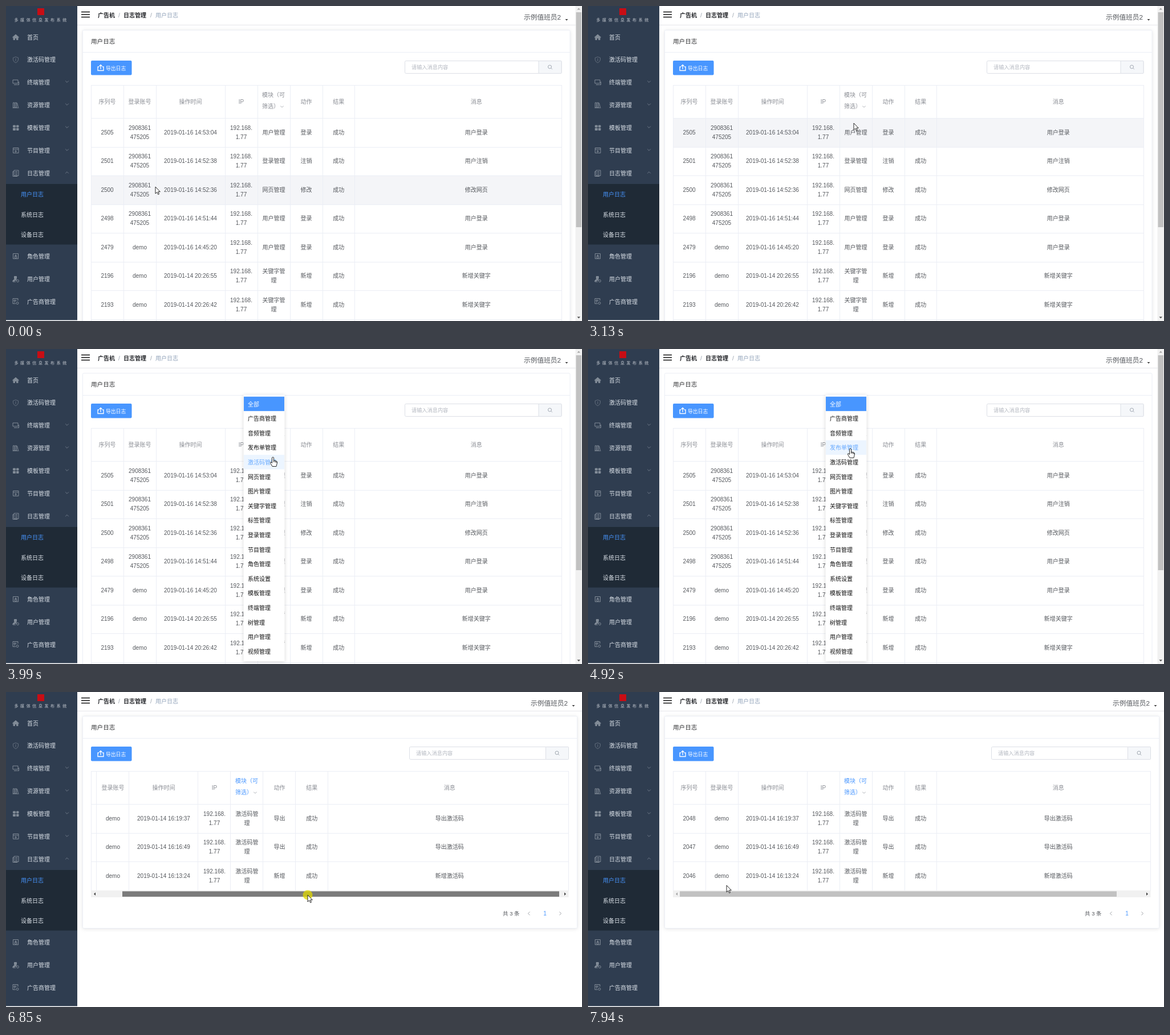
An HTML page for the animation above (8 s loop, 1010 by 554 pixels).

```html
<!DOCTYPE html>
<html lang="zh-CN">
<head>
<meta charset="utf-8">
<title>用户日志</title>
<style>
html, body { margin: 0; width: 100%; height: 100%; overflow: hidden; background: #fff; }
svg { display: block; font-family: "Liberation Sans", "Noto Sans CJK SC", "Noto Sans CJK", sans-serif; }
.line { fill: none; stroke: #ebeef5; shape-rendering: crispEdges; }
.icon { fill: none; stroke: #818b97; }
.solid { fill: #818b97; }
.faint { opacity: .6; }
.card { fill: #fff; stroke: #ebeef5; }
.raised .card { filter: drop-shadow(0 1px 3px rgba(0,0,0,.1)); }
</style>
</head>
<body>
<svg id="stage" width="1010" height="554" viewBox="0 0 1010 554"></svg>
<script>
const BLUE = '#4896ff', GREY = '#8a8d94', DARK = '#55585d', PALE = '#a0a4ab', MENU = '#dae0e7';
const stage = document.getElementById('stage');
const $ = id => document.getElementById(id);

// y is the visual middle of the line
const text = (x, y, s, size = 10, fill = DARK, anchor = 'start', more = '') =>
  `<text x="${x}" y="${y + size * .37}" font-size="${size}" fill="${fill}" text-anchor="${anchor}" ${more}>${s}</text>`;
const mid = (x, y, s, size, fill) => text(x, y, s, size, fill, 'middle');
const rect = (x, y, w, h, fill, more = '') =>
  `<rect x="${x}" y="${y}" width="${w}" height="${h}" fill="${fill}" ${more}/>`;
const path = (d, more = 'class="icon"') => `<path d="${d}" ${more}/>`;
const group = (id, body, more = '') => `<g id="${id}" ${more}>${body}</g>`;
// (dx, dy) is half the way from the open side to the tip
const chevron = (x, y, dx, dy, color) =>
  path(dx ? `M${x - dx} ${y - 3}l${dx * 2} 3l${-dx * 2} 3` : `M${x - 2.8} ${y - dy}l2.800 ${dy * 2}l2.800 ${-dy * 2}`,
    `fill="none" stroke="${color}" stroke-width=".8"`);

function sidebar() {
  const menu = [
    ['首页', 55, 'M11.500 55l5.500-5 5.500 5h-1.500v4.500h-2.500v-3h-3v3h-2.500v-4.500z', 'solid'],
    ['激活码管理', 94.5, 'M17 89.500l4.500 1.500v4q-1 3.500-4.500 5q-3.500-1.500-4.500-5v-4zM17 92v5', 'faint'],
    ['终端管理', 134, 'M12 130h9v6h-9zM14 138.500h5M22.500 133v5.500h-3'],
    ['资源管理', 174, 'M12.500 170v8.500h2.500v-8.500zM16 170v8.500h2.500v-8.500zM19.500 170.500l2 8M11.500 179h11'],
    ['模板管理', 214, 'M12.500 210h4v3h-4zM18.500 210h3.500v3h-3.500zM12.500 215h4v3.500h-4zM18.500 215h3.500v3.500h-3.500z', 'solid'],
    ['节目管理', 254, 'M12.500 249.500h9.500v9h-9.500zM12.500 252h9.500M16 254l3 1.500l-3 1.500z'],
    ['日志管理', 294, 'M14 289h8v9.500h-8zM14 291h-2v8.500h8M16 291.500h4M16 294h4M16 296.500h4'],
    ['角色管理', 440, 'M12.500 435.500h9v9h-9zM15 443v-2q2-2 4 0v2zM16 438h2v2h-2z'],
    ['用户管理', 480, 'M14.500 475.500h4v4h-4zM12 485v-2q4-5 7-1M12 485h5', 'solid'],
    ['广告商管理', 520, 'M21 518v-3.500h-9v9h5M14 517h3v2h-3zM18.500 517h1M14 521h2']
  ];
  const badge = (x, y) => `<circle cx="${x}" cy="${y}" r="2" class="icon"/>`;
  return rect(0, 0, 125, 552.5, '#2f3d50')
    + rect(0, 313, 125, 106.500, '#1f2a36')
    + rect(55, 4, 12, 12, '#c80d14')
    + text(14.5, 24, '多媒体信息发布系统', 7, '#c4c9d0', 'start', 'letter-spacing="3.6"')
    + menu.map(([s, y, d, style = '']) => path(d, `class="icon ${style}"`) + text(37, y, s, 10, MENU)).join('')
    + badge(20.5, 483.5) + badge(20, 522.5)
    + [134, 174, 214, 254, 294].map(y => chevron(107, y - 1, 0, y > 290 ? -1.4 : 1.4, '#7d8896')).join('')
    + [['用户日志', 331], ['系统日志', 367], ['设备日志', 402.5]]
        .map(([s, y], i) => text(26, y, s, 10, i ? MENU : BLUE)).join('');
}

function topBar() {
  const bold = (x, s) => text(x, 16.5, s, 10, '#222428', 'start', 'font-weight="bold"');
  const slash = x => text(x, 16.5, '/', 10, '#97a0ac');
  return path('M125 33.500H1010', 'class="line" style="stroke:#e4e6ea"')
    + path('M132 10.500h15M132 15h15M132 19.500h15', 'stroke="#111" stroke-width="1.6"')
    + bold(161, '广告机') + slash(197) + bold(206, '日志管理') + slash(253)
    + text(262, 16.5, '用户日志', 10, '#8fa1b8');
}

const COLS = [149, 206, 263, 384, 441, 498, 555, 611.5, 1038];
const HEADS = ['序列号', '登录账号', '操作时间', 'IP', '', '动作', '结果', '消息'];
const ROW_TOP = 197.5, ROW = 50.5;
const center = i => (COLS[i] + COLS[i + 1]) / 2;

function cell(col, y, lines) {
  return lines.map((s, i) => mid(center(col), y + (i - (lines.length - 1) / 2) * 16.2, s)).join('');
}

function table(id, rows, right, bottom, filtered) {
  const tint = filtered ? BLUE : GREY;
  let body = HEADS.map((s, i) => mid(center(i), 168, s, 10, GREY)).join('')
    + mid(469, 156, '模块（可', 10, tint) + text(449, 176.5, '筛选）', 10, tint)
    + chevron(484, 177, 0, 1.1, PALE);
  let lines = `M149 139.500H${right}M149 ${ROW_TOP}H${right}`;
  rows.forEach(([no, user, time, module, action, message], r) => {
    const y = ROW_TOP + ROW * (r + .5) - .7;
    lines += `M149 ${ROW_TOP + ROW * (r + 1)}H${right}`;
    [[no], user.split(' '), [time], ['192.168.', '1.77'], module.split(' '), [action], ['成功'], [message]]
      .forEach((parts, c) => body += cell(c, y, parts));
  });
  body += path(COLS.slice(1, 8).map(x => `M${x} 139V${bottom}`).join(''), 'class="line"');
  return `<clipPath id="${id}Clip"><rect x="149" y="139" width="${right - 149}" height="${bottom - 139}"/></clipPath>`
    + rect(149, 0, right - 149, ROW, '#f4f5f8', `id="${id}Hover"`)
    + `<g clip-path="url(#${id}Clip)">${group(id + 'Body', body)}</g>`
    + path(`${lines}M149 139V${bottom}M${right} 139V${bottom}`, 'class="line"');
}

function page(id, right, shift, cardBottom, content) {
  const split = right - 40, left = 699 + shift * 2 / 3;
  return group(id,
    `<rect class="card" x="134.500" y="42.500" width="${right + 15 - 134.5}" height="${cardBottom - 42.5}" rx="2"/>`
    + path(`M135 81.500H${right + 15}`, 'class="line"')
    + text(149, 62, '用户日志', 10.6, '#303133')
    + rect(149, 96, 71.5, 25.5, BLUE, 'rx="2"')
    + path('M163 107h-2v6.500h10v-6.500h-2M166 111v-7M163.500 106l2.500-2.500l2.500 2.500', 'fill="none" stroke="#fff" stroke-width="1.3"')
    + text(175, 109.5, '导出日志', 8.8, '#fff')
    + rect(left + .5, 96.5, right - left - .5, 22, '#fff', 'rx="2" stroke="#dcdfe6"')
    + rect(split, 96.5, 40, 22, '#f5f7fa', 'rx="1" stroke="#dcdfe6"')
    + text(left + 12, 107.5, '请输入消息内容', 9.2, '#b4b8c0')
    + `<g opacity=".75"><circle cx="${split + 19.5}" cy="107" r="3" class="icon"/>${path(`M${split + 21.8} 109.300l2 2`)}</g>`
    + text(908 + shift, 20, '示例值班员2', 11.7)
    + path(`M${980.5 + shift} 23h5l-2.500 2.800z`, 'fill="#444"')
    + content);
}

const ALL_ROWS = [
  ['2505', '2908361 475205', '2019-01-16 14:53:04', '用户管理', '登录', '用户登录'],
  ['2501', '2908361 475205', '2019-01-16 14:52:38', '登录管理', '注销', '用户注销'],
  ['2500', '2908361 475205', '2019-01-16 14:52:36', '网页管理', '修改', '修改网页'],
  ['2498', '2908361 475205', '2019-01-16 14:51:44', '用户管理', '登录', '用户登录'],
  ['2479', 'demo', '2019-01-16 14:45:20', '用户管理', '登录', '用户登录'],
  ['2196', 'demo', '2019-01-14 20:26:55', '关键字管 理', '新增', '新增关键字'],
  ['2193', 'demo', '2019-01-14 20:26:42', '关键字管 理', '新增', '新增关键字']
];
const CODE_ROWS = [
  ['2048', 'demo', '2019-01-14 16:19:37', '激活码管 理', '导出', '导出激活码'],
  ['2047', 'demo', '2019-01-14 16:16:49', '激活码管 理', '导出', '导出激活码'],
  ['2046', 'demo', '2019-01-14 16:13:24', '激活码管 理', '新增', '新增激活码']
];
const MODULES = '全部 广告商管理 音频管理 发布单管理 激活码管理 网页管理 图片管理 关键字管理 标签管理 登录管理 节目管理 角色管理 系统设置 模板管理 终端管理 树管理 用户管理 视频管理'.split(' ');
const ITEM_TOP = 83.8, ITEM = 25.59;

const pageScroll = rect(998.5, 0, 11.5, 554, '#f1f1f1') + rect(999.5, 11, 9.5, 378, '#c1c1c1')
  + path('M1001.500 6.500h5.500l-2.750-3z', 'fill="#a3a3a3"') + path('M1001.500 546.500h5.500l-2.750 3z', 'fill="#505050"');
const tableScroll = rect(149, 349, 837.5, 12, '#f1f1f1') + rect(161, 350.5, 766, 9.5, '#c1c1c1', 'id="thumb"')
  + path('M157 352.500v5.500l-3-2.750z', 'id="leftArrow"') + path('M979 352.500v5.500l3-2.750z', 'id="rightArrow"');
const pager = text(871, 389.5, '共 3 条', 9.5) + chevron(917, 389.5, -1.5, 0, GREY)
  + mid(945, 389.5, '1', 10, BLUE) + chevron(972, 389.5, 1.5, 0, GREY);

const dropdown = rect(416.5, 80.5, 72, 468.5, '#fff', 'style="filter:drop-shadow(0 1px 3px rgba(0,0,0,.16))"')
  + MODULES.map((s, i) => rect(417, ITEM_TOP + i * ITEM, 71, ITEM, '#fff', 'class="itemBox"')
    + text(424, ITEM_TOP + (i + .5) * ITEM + .4, s, 10, '#111', 'start', 'class="itemText"')).join('');

const arrow = path('M0 0V12L2.800 9.400L4.700 13.500L6.500 12.700L4.700 8.700H8.300Z',
  'id="arrow" fill="#fff" stroke="#111" stroke-width=".9"');
const hand = path('M-1.500 1Q0-1 1.500 1V6L6 7Q7.800 7.500 7.500 10L6 16.500H-1L-4.500 10.500Q-5 8.500-3 9L-1.500 10.500Z M1.500 6v3M4 6.500v3M6 7.500v2.500',
  'id="hand" fill="#fff" stroke="#111" stroke-width=".9"');

stage.innerHTML = rect(0, 0, 1010, 554, '#fff') + topBar()
  + page('allPage', 974, 0, 570, table('all', ALL_ROWS, 974, 554, false) + pageScroll)
  + page('codePage', 986.5, 12, 415.5, table('code', CODE_ROWS, 986.5, 349, true) + tableScroll + pager)
  + sidebar()
  + group('dropdown', dropdown)
  + group('pointer', '<circle id="press" r="8.500" fill="#e0d800" opacity=".75"/>' + arrow + hand);

const itemBoxes = document.querySelectorAll('.itemBox'), itemTexts = document.querySelectorAll('.itemText');

// Bursts of movement: start, end, number of steps
const BURSTS = [[220, 600, 6], [750, 1520, 11], [1600, 1750, 3], [3130, 3910, 11], [3990, 4290, 5], [4460, 4460, 1],
  [4610, 4920, 5], [5240, 5470, 4], [5620, 6390, 11], [6470, 6540, 2], [6780, 7000, 4], [7230, 7940, 10]];

// Whole part: bursts finished; fraction: steps done in the current one
function phaseAt(t) {
  let phase = 0;
  for (const [start, end, n] of BURSTS) {
    if (t < start) break;
    const step = n > 1 ? Math.floor((t - start) / (end - start) * (n - 1) + .04) + 1 : 1;
    phase += Math.min(1, step / n);
  }
  return phase;
}

// Keys are [phase, values...]
function sample(keys, phase) {
  const i = keys.findIndex(k => k[0] >= phase);
  if (i < 0) return keys[keys.length - 1].slice(1);
  if (!i) return keys[0].slice(1);
  const a = keys[i - 1], b = keys[i], f = (phase - a[0]) / (b[0] - a[0]);
  return a.slice(1).map((v, j) => v + (b[j + 1] - v) * f);
}

const POINTER = [[0, 262, 318], [.5, 190, 305], [1, 127, 323], [1.2, 150, 325], [2, 414, 222], [3, 470, 210],
  [3.091, 466, 206], [3.4, 467, 176], [3.8, 467, 178], [4, 468, 184], [4.2, 468, 190], [5, 459, 216], [6, 459, 215],
  [7, 460, 175], [8, 461, 197], [8.2, 461, 197], [9, 485, 338], [9.5, 486, 355], [10, 486, 356], [10.25, 507, 356],
  [10.5, 529, 357], [11, 545, 357], [11.4, 470, 357], [11.6, 440, 356], [12, 243, 340]];
const THUMB = [[10, 0], [10.25, 21], [10.5, 43], [10.75, 47.5], [11, 47.5], [11.4, 0]];
const OPEN = [[3.45, 0], [3.6, .6], [3.85, 1], [8, 1], [8.091, .75], [8.182, .266], [8.273, 0]];

const show = (id, on) => $(id).setAttribute('visibility', on ? 'visible' : 'hidden');
const set = (id, name, value) => $(id).setAttribute(name, value);
const between = (v, a, b) => v > a && v < b;

function hoverRow(id, y, on) {
  const row = Math.floor((y - ROW_TOP) / ROW);
  set(id + 'Hover', 'y', ROW_TOP + row * ROW);
  set(id + 'Hover', 'opacity', on && row >= 0 ? 1 : 0);
}

function draw(now) {
  const phase = phaseAt(now % 8000);
  const [x, y] = sample(POINTER, phase), [thumb] = sample(THUMB, phase), [open] = sample(OPEN, phase);
  const filtered = phase > 8.15, pointing = between(phase, 3.3, 8.15);

  set('allPage', 'display', filtered ? 'none' : 'inline');
  set('codePage', 'display', filtered ? 'inline' : 'none');
  set('allPage', 'class', x > 134 && open < .5 ? 'raised' : '');
  set('codePage', 'class', phase > 8.4 ? 'raised' : '');
  hoverRow('all', y, x > 149 && phase < 3.3);
  hoverRow('code', y, between(phase, 8.4, 9.1));

  set('dropdown', 'display', open ? 'inline' : 'none');
  set('dropdown', 'opacity', open);
  set('dropdown', 'transform', `translate(0 80.5) scale(1 ${open}) translate(0 -80.5)`);
  const chosen = phase > 8.05 ? 4 : 0, hovered = Math.floor((y - ITEM_TOP) / ITEM);
  MODULES.forEach((_, i) => {
    const over = i === hovered && open === 1;
    itemBoxes[i].setAttribute('fill', i === chosen ? BLUE : over ? '#ecf5ff' : '#fff');
    itemTexts[i].setAttribute('fill', i === chosen ? '#fff' : over ? '#66a9ff' : '#111');
  });

  set('codeBody', 'transform', `translate(${-thumb * 837.5 / 766} 0)`);
  set('thumb', 'x', 161 + thumb);
  set('thumb', 'fill', between(phase, 9.9, 11.55) ? '#7b7b7b' : between(phase, 9.4, 9.9) ? '#a8a8a8' : '#c1c1c1');
  set('leftArrow', 'fill', thumb ? '#404040' : '#a3a3a3');
  set('rightArrow', 'fill', thumb > 47 ? '#a3a3a3' : '#404040');

  set('pointer', 'transform', `translate(${x} ${y})`);
  show('arrow', !pointing);
  show('hand', pointing);
  show('press', between(phase, 3.4, 3.6) || between(phase, 8.05, 8.15) || between(phase, 9.9, 11.55));
  requestAnimationFrame(draw);
}
requestAnimationFrame(draw);
</script>
</body>
</html>
```
